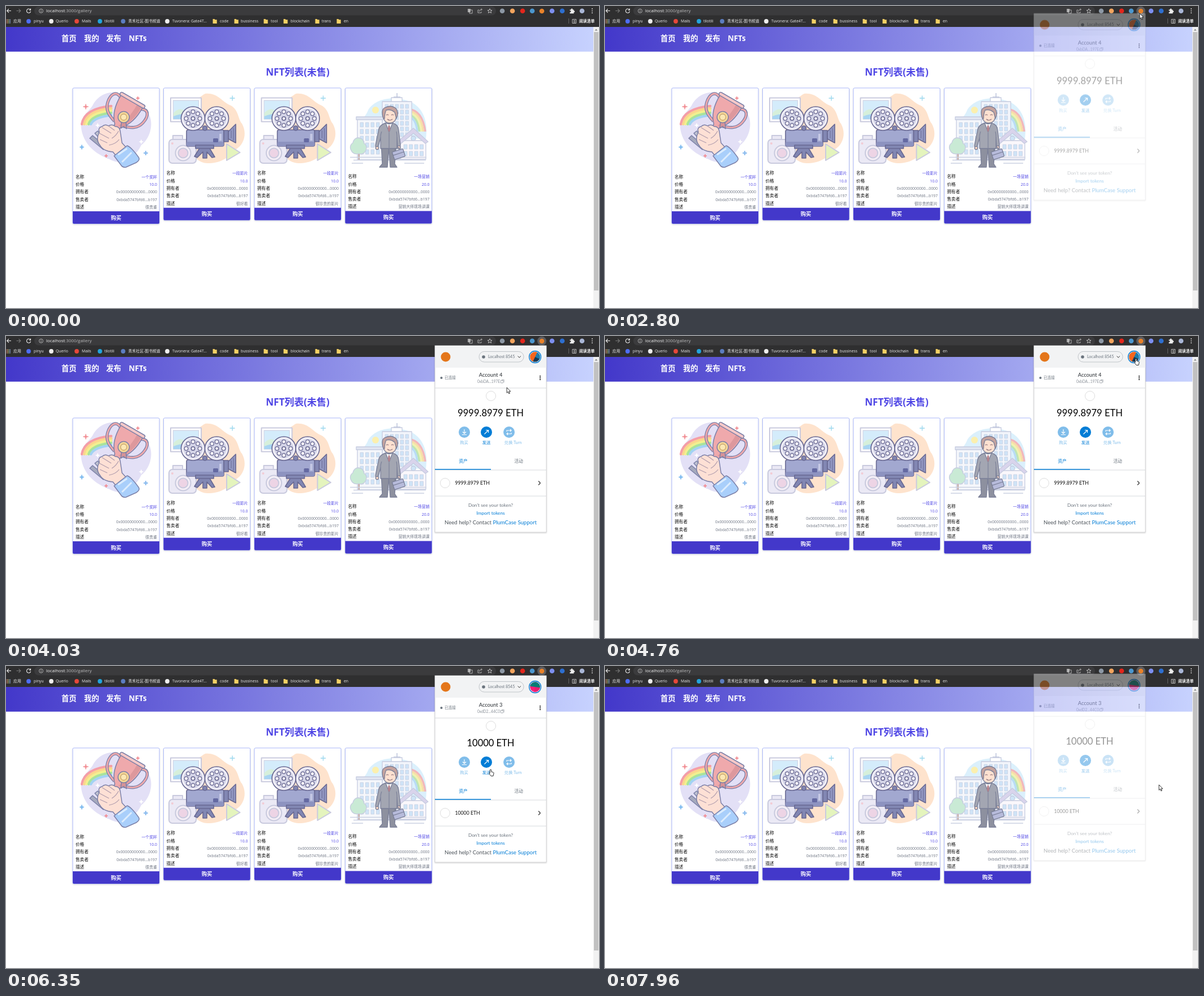
Write an HTML page that moves like this. It is 1048 px wide and 534 px high and loops after 8000 ms.

```html
<!DOCTYPE html>
<html lang="zh">
<head>
<meta charset="utf-8">
<title>NFT gallery</title>
<style>
html, body { margin: 0; width: 100%; height: 100%; overflow: hidden; background: #fff; }
svg { display: block; width: 1048px; height: 534px; font-family: "Open Sans", "Noto Sans CJK SC", "Noto Sans CJK", sans-serif; }
#popup { font-family: Lato, "Noto Sans CJK SC", "Noto Sans CJK", sans-serif; }
#cursor, #popup { animation: 8s linear infinite; }
#hover, #menu, #hand, #arrow, .before, .after { animation: 8s step-end infinite; }
#cursor { animation-name: travel; }
#popup { animation-name: popup; }
#hover { animation-name: hover; }
#menu { animation-name: menu; }
#hand { animation-name: hand; }
#arrow { animation-name: arrow; }
.before { animation-name: before; }
.after { animation-name: after; }
@keyframes travel {
  0%, 4.6% { transform: translate(1060px, 320px); }
  4.63% { transform: translate(1041px, 300px); }
  9.4% { transform: translate(956px, 24px); }
  14.1%, 15% { transform: translate(966px, 32px); }
  18% { transform: translate(884px, 10px); }
  21%, 21.6% { transform: translate(944px, 28px); }
  25%, 27.6% { transform: translate(947px, 12px); }
  28.5%, 41.7% { transform: translate(945px, 13px); }
  48.6%, 49.5% { transform: translate(880px, 96px); }
  59.5%, 61.5% { transform: translate(937px, 40px); }
  70.1%, 76.7% { transform: translate(853px, 183px); }
  76.8%, 90.4% { transform: translate(855px, 183px); }
  94.6%, 100% { transform: translate(979px, 210px); }
}
@keyframes popup {
  0%, 34% { opacity: 0; transform: translateY(-6px); }
  36.75%, 97.5% { opacity: 1; transform: none; }
  99.5%, 100% { opacity: .42; transform: translateY(-3px); }
}
@keyframes hover { 0% { opacity: 0; } 20.5% { opacity: 1; } }
@keyframes menu { 0% { opacity: 0; } 61.25% { opacity: 1; } 78.5%, 100% { opacity: 0; } }
@keyframes hand { 0% { opacity: 0; } 58.8% { opacity: 1; } 91%, 100% { opacity: 0; } }
@keyframes arrow { 0% { opacity: 1; } 58.8% { opacity: 0; } 91%, 100% { opacity: 1; } }
@keyframes before { 0% { opacity: 1; } 78.5%, 100% { opacity: 0; } }
@keyframes after { 0% { opacity: 0; } 78.5%, 100% { opacity: 1; } }
</style>
</head>
<body>
<svg id="stage" viewBox="0 0 1048 534"></svg>
<script>
const text = (x, y, size, str, fill = '#000', extra = '') =>
  `<text x="${x}" y="${y}" font-size="${size}" fill="${fill}" ${extra}>${str}</text>`;
const mid = 'text-anchor="middle"', end = 'text-anchor="end"', bold = 'font-weight="700"';
const rect = (x, y, w, h, fill, extra = '') =>
  `<rect x="${x}" y="${y}" width="${w}" height="${h}" fill="${fill}" ${extra}/>`;
const disc = (x, y, r, fill, extra = '') => `<circle cx="${x}" cy="${y}" r="${r}" fill="${fill}" ${extra}/>`;
const line = (d, stroke, w = 1, extra = '') =>
  `<path d="${d}" fill="none" stroke="${stroke}" stroke-width="${w}" ${extra}/>`;
const shape = (d, fill, extra = '') => `<path d="${d}" fill="${fill}" ${extra}/>`;
const group = (body, attrs) => `<g ${attrs}>${body}</g>`;
const edge = (color, w = 1.5) => `stroke="${color}" stroke-width="${w}" stroke-linejoin="round"`;
const each = (list, fn) => list.map(fn).join('');
const range = n => [...Array(n).keys()];

function browser() {
  const marks = [[49, 'pinyu'], [88, 'Querlo'], [134, 'Mails'], [174, 'tilotili'], [216, '青禾社区-图书频道'],
    [294, 'Tuvonera: Gate4T...'], [378, 'code'], [415, 'bussiness'], [468, 'tool'], [503, 'blockchain'],
    [558, 'trans'], [597, 'en']];
  const icons = [[40, '#4e6ef2'], [80, '#eee'], [125, '#e5483b'], [166, '#23a4dc'], [207, '#5c7dc0'], [285, '#eee']];
  const tools = [[877, '#8d98a5'], [895, '#f3a45e'], [913, '#e3261c'], [930, '#4c97cf'],
    [965, '#7d8ff0'], [983, '#2e6fd0'], [1018, '#a9b6d6']];
  return rect(0, 0, 1048, 37, '#2f2f30') + rect(50, 1, 816, 15.5, '#3b3b3d', 'rx="7.7"') +
    line('M9 8.5H2M5 5.2L1.7 8.5L5 11.8', '#eee', 1.1) +
    line('M18.5 8.5h7M22.5 5.2l3.3 3.3l-3.3 3.3', '#777', 1.1) +
    line('M43 6.5A3.6 3.6 0 1 0 43.6 9.5M43.5 4.5v2.7h-2.7', '#eee', 1.1) +
    disc(62, 8.7, 3.5, 'none', edge('#ccc', .8)) + line('M62 8v2.5M62 6.6v.8', '#ccc', .9) +
    text(71, 11.4, 7.9, 'localhost<tspan fill="#bbb">:3000/gallery</tspan>', '#f4f4f4') +
    rect(816, 5, 5, 6, '#aaa') + rect(819, 7, 5, 6, 'none', edge('#ccc', .8)) +
    line('M836 7h-2v5h6v-2M836 10q1-4 5-4M839.5 4.5l2 1.6l-2 1.8', '#ccc', .8) +
    shape('M855 4.8l1.1 2.6 2.8.2-2.1 1.9.7 2.8-2.5-1.5-2.5 1.5.7-2.8-2.1-1.9 2.8-.2z', 'none', edge('#ddd', .8)) +
    disc(947, 8.8, 8, '#5d5d60', 'id="hover"') + disc(947, 9, 4.3, '#e8822a') +
    each(tools, ([x, c]) => disc(x, 8.8, 4.3, c)) +
    shape('M996.5 6.5h2.2a1.4 1.4 0 1 1 2.6 0h2.2v2a1.3 1.3 0 1 1 0 2.5v2.2h-7v-2.4a1.3 1.3 0 1 0 0-2.4z', '#eee') +
    each([5, 8.6, 12.2], y => disc(1036, y, .9, '#eee')) +
    each(range(9), i => rect(1 + i % 3 * 2.6, 23.6 + (i / 3 | 0) * 2.6, 1.7, 1.7, ['#d98b6b', '#a9bf79', '#8aa6d1'][i % 3])) +
    text(13, 29.4, 6.9, '应用', '#eee') +
    each(icons, ([x, c]) => disc(x, 27, 3.9, c)) +
    each([369, 407, 459, 494, 550, 588], x => shape(`M${x - 3.5} 23h3l1 1.2h3.2v6.8h-7.2z`, '#f3d065')) +
    each(marks, ([x, s]) => text(x, 29.4, 6.8, s, '#eee')) +
    line('M994.5 22v9', '#666') + rect(1001, 23.5, 6.5, 7, 'none', edge('#ddd', .8)) +
    line('M1003 25.5h3M1003 27.2h3M1003 29h3', '#ddd', .8) + text(1013, 29.4, 6.8, '阅读清单', '#fff', bold);
}

const spark = (x, y, r, c) =>
  shape(`M${x} ${y - r}Q${x} ${y} ${x + r} ${y}Q${x} ${y} ${x} ${y + r}Q${x} ${y} ${x - r} ${y}Q${x} ${y} ${x} ${y - r}`, c, edge(c, 1));

function trophy() {
  const dark = '#7c80a8', ink = edge(dark, 1.5), red = '#efa9ac';
  const handle = s => `M${s * 21} -21C${s * 34} -28 ${s * 39} -16 ${s * 36} -2C${s * 33} 12 ${s * 22} 17 ${s * 9} 21`;
  const cup = each([1, -1], s => line(handle(s), dark, 5.4) + line(handle(s), red, 2.8)) +
    shape('M-22 -25Q-23 8 -6 25L-4 42H4L6 25Q23 8 22 -25Z', red, ink) +
    shape('M11 -24Q11 6 1 24H5Q20 8 20 -24Z', '#dd989d') + rect(-25, -30, 50, 6, '#f6c9c8', 'rx="3" ' + ink);
  return shape('M133 217C130 195 144 190 153 176C162 158 183 147 204 156C224 158 233 171 248 184C263 202 257 232 239 246C229 268 205 284 183 271C164 264 138 249 133 217Z', '#e3e0f6') +
    each(['#f59ea6', '#fbd58d', '#f2f08f', '#a9e39b', '#a3d3f3'], (c, i) =>
      line(`M${134 + i * 4} 209Q${139 + i * 4} ${181 + i * 4} 186 ${177 + i * 4}`, c, 4.3, 'stroke-linecap="round"')) +
    group(cup, 'transform="translate(210 190) rotate(30)"') +
    shape('M204 205l-1 11 5-3 5 4-1-12z', '#d79397', ink) + disc(208, 196.5, 10, '#f6d797', ink) +
    disc(208, 196.5, 5.5, '#fbe7b4', edge('#c9a56e', 1.3)) +
    shape('M148 234l5-5 24 20-5 5z', '#a5a9bd', ink) +
    shape('M157 225l5-4 16 18-4 5z', '#bfc2d2', ink) +
    shape('M165 223Q162 215 170 213Q175 208 181 212Q188 208 193 213Q201 213 202 222L205 242L216 254L200 272L189 258Q172 257 166 246Q158 236 165 223Z', '#fde0d5', ink) +
    line('M170 215l16 10M165 225l17 9M166 236l13 6M181 212l11 8M187 234q8-5 12-13M182 246q12-2 18-10', '#b09cad', 1.2) +
    shape('M191 265L214 247Q221 249 234 267Q238 272 230 277L212 285Q206 286 203 281Z', '#a9cffb', ink) +
    line('M198 263l16-11M205 276l17-17', '#dcecfe', 3) +
    spark(141, 178, 4.5, '#f28f95') + spark(233, 163, 3, '#f28f95') + spark(177, 265, 3, '#f28f95') +
    spark(247, 260, 4, '#8abbee') + spark(134, 249.5, 4, '#7dbaf0') + spark(239, 240, 3.5, '#fff') + spark(162, 211, 3.5, '#fff');
}

function film() {
  const dark = '#686892', ink = edge(dark, 1.6), pale = edge('#c9cade', 2);
  const reel = x => disc(x, 199, 21, '#f0eef6', ink) + disc(x, 199, 17, '#d5d5e8') +
    each(range(8), i => disc(x + 12 * Math.cos(i * Math.PI / 4), 199 + 12 * Math.sin(i * Math.PI / 4), 3.3, '#f4f1f7', edge(dark, 1.3))) +
    disc(x, 199, 3.2, '#f4f1f7', edge(dark, 1.6));
  return shape('M319 216C315 188 334 165 352 155C372 153 379 166 393 174C412 181 409 199 417 208C427 226 420 245 407 253C391 270 379 278 356 278C330 277 319 248 319 216Z', '#fee3cd') +
    rect(291, 162.5, 54, 42, '#fff', pale) + rect(295.5, 167, 45, 33, '#d4ecfb', edge('#d3d7e8', 1.3)) +
    shape('M296 189Q307 177 317 187Q328 178 340 190V199.5H296Z', '#d6efdb') + shape('M296 195q22-9 44 0v5h-44z', '#a9d5f2') +
    rect(288, 236, 48, 42, '#ebe9f5', 'rx="6" ' + pale) + rect(295, 229, 17, 7, '#ebe9f5', pale) +
    disc(313, 260, 13.5, '#f5eff7', pale) + disc(313, 260, 8.5, '#edd4e5', pale) + disc(294, 243, 2, '#f3cbd4') +
    shape('M390 244L413.5 259L390 273Z', '#e4f4bd', pale) +
    line('M400 158.5v9M395.5 163h9', '#9bd8ee', 1.4) +
    shape('M343 250h16l10 17-5 1-9-10v11h-7v-11l-10 10-5-2z', '#8287b3', ink) +
    rect(319, 219, 66, 29, '#a2a8d0', 'rx="3" ' + ink) + rect(319, 240, 66, 8, '#8d93c0', 'rx="3"') +
    rect(335, 246, 32, 6, '#8287b3', ink) + rect(385, 220, 8, 20, '#8287b3', ink) +
    shape('M393 222L406 209V242L393 235Z', '#9399c4', ink) + line('M398 220v14M402 216v22', dark) +
    rect(366, 234, 9, 7, '#6469a2', 'rx="1.5"') + rect(377, 226, 4, 12, '#c5c8e4') +
    reel(330.5) + reel(372.5) + disc(351.5, 216, 4, '#8287b3', ink);
}

function speaker() {
  const pale = edge('#c6cce0', 1.3), ink = edge('#7a7f98', 1.3), cloth = '#a3a6b2';
  const windows = (x, y, cols, rows, dx, dy, w, h) => each(range(cols * rows), i =>
    rect(x + i % cols * dx, y + (i / cols | 0) * dy, w, h, '#cfe4f7', edge('#c6cce0', .7)));
  return shape('M625 231C616 207 636 198 640 184C653 163 684 160 704 166C730 171 748 195 742 235Z', '#dbf0fc') +
    each(['#f2b7bc', '#f8dda8', '#f1f2b0', '#bfe5b4', '#b9dcf5'], (c, i) =>
      line(`M710 ${182 + i * 3.5}Q${736 - i * 3} ${184 + i * 3} ${741 - i * 3.5} 222`, c, 3.6)) +
    disc(653, 184, 6, '#fbefae') +
    line('M691 154v15M685 161h12', '#bcc3db', 1.5) + rect(681, 162, 19, 8, '#fff', pale) +
    rect(665, 169, 52, 102, '#f2f5fb', pale) + windows(670, 174, 5, 6, 9, 10, 5.5, 7) +
    rect(621, 198, 44, 74, '#f5f7fb', pale) + rect(619, 196, 48, 5, '#e1e6f2', pale) + windows(626, 206, 4, 5, 9.5, 12, 5.5, 8) +
    rect(697, 238, 45, 33, '#faf7fb', pale) + shape('M692 240L720 216L746 240L741 243L720 225L697 244Z', '#d9d4ec', pale) +
    windows(703, 245, 4, 2, 9.5, 12, 6, 8) + disc(720, 234, 4, '#cfe4f7', pale) +
    rect(622.5, 255, 2.5, 17, '#c3a9a5') +
    shape('M609 253Q607 246 613 242Q615 233 623 233Q632 234 633 243Q639 247 636 255Q632 264 623 261Q613 264 609 253Z', '#c9ead5', pale) +
    line('M608 267.5h135M614 272.5h128M611 278h20M704 278h35', '#ccd1e2', 1.3) +
    shape('M663 242L665 279L660 285H674L676.5 252L679 285H691L687 279L690 242Z', '#8d909f', ink) +
    shape('M671 207Q659 210 658 222L653 246Q652 251 657 251L662 233V252H691V233L692 249Q697 251 697 245L694 220Q693 209 683 207Z', cloth, ink) +
    shape('M671 207l6 16 6-16-6 2z', '#fff', ink) + shape('M675.7 211h2.6l1 7-2.3 5-2.3-5z', '#b5838c') +
    line('M677 224v27M662 233q0-7 2-11M691 233q0-7-1-11', '#7a7f98', 1.1) +
    shape('M666 192Q665 180 677 179Q690 180 690 192Q690 207 677.5 207Q667 206 666 192Z', '#fde0d0', ink) +
    shape('M667 199Q662 184 669 180Q680 174 689 181Q695 188 690 199L687 188Q680 182 672 184Q669 190 669 199Z', '#c5a39f', ink) +
    line('M672 193q2-2 4 0M681 193q2-2 4 0M674 200q4 4 9 0', '#8b717b', 1.1) +
    disc(656, 251, 2.7, '#fbd8c5', ink) + disc(694.5, 250, 2.7, '#fbd8c5', ink) +
    group(rect(684, 255, 20, 14, '#b7bbdb', 'rx="1.5" ' + ink) + line('M690 255v-4h8v4M684 261h20', '#7a7f98', 1.2), 'transform="rotate(-18 694 262)"');
}

function card(x, dy, art, name, price, note) {
  const rows = [['名称', name], ['价格', price], ['拥有者', '0x00000000000...0000'], ['售卖者', '0xbda5747bfd6...b197'], ['描述', note]];
  return rect(x, 145, 153, 240 + dy, '#fff', 'rx="2" stroke="#a5b4fc" stroke-width=".9" filter="url(#soft)"') + art +
    each(rows, ([label, value], i) => {
      const y = 304.7 + dy + i * 13.3;
      return text(x + 5, y, 7.6, label, '#111') +
        text(x + 149, y, 6.9, value, i < 2 ? '#4f46e5' : '#6b7280', end);
    }) +
    shape(`M${x} ${363 + dy}h153v20q0 2-2 2h-149q-2 0-2-2z`, '#4338ca') +
    text(x + 76.5, 377.5 + dy, 9.3, '购买', '#fff', `${mid} ${bold}`);
}

function page() {
  return rect(0, 37, 1038, 43.7, 'url(#nav)') +
    each([[98, '首页'], [138, '我的'], [177, '发布'], [217, 'NFTs']], ([x, s]) => text(x, 62, 13.3, s, '#fff', bold)) +
    text(515.5, 123.3, 17, 'NFT列表(未售)', '#4f46e5', `${mid} ${bold}`) +
    card(118, 0, trophy(), '一个奖杯', '10.0', '很贵重') +
    card(278.5, -6.3, film(), '一段影片', '10.0', '很好看') +
    card(439, -6.3, group(film(), 'transform="translate(160.5)"'), '一段影片', '10.0', '很珍贵的影片') +
    card(599.5, -.5, speaker(), '一场营销', '20.0', '营销大师现场讲课') +
    rect(1038, 37, 10, 497, '#f1f1f1') + rect(1039, 46, 8, 457, '#c1c1c1') +
    shape('M1040.5 43.5l2.5-3 2.5 3z', '#8a8a8a');
}

const blob = (x, y, r, base, half, angle, wedge) => group(
  disc(0, 0, r, base) + shape(`M${-r} 0A${r} ${r} 0 0 1 ${r} 0Z`, half) +
  shape(`M0 0L${r} 0A${r} ${r} 0 0 1 0 ${r}Z`, wedge), `transform="translate(${x} ${y}) rotate(${angle})"`);
const face = {
  1: (x, y, r) => blob(x, y, r, '#f5961d', '#2385c4', -135, '#168c83'),
  2: (x, y, r) => blob(x, y, r, '#f5861d', '#086b78', 25, '#184f6e'),
  3: (x, y, r) => blob(x, y, r, '#f81d78', '#087d75', 8, '#ea1d70'),
  4: (x, y, r) => blob(x, y, r, '#173956', '#f5651c', -65, '#1b7dac')
};

function account(n, address, balance) {
  return face[n](935, 37, 9) + text(856.5, 72.2, 9.3, 'Account ' + n, '#24292e', mid) +
    text(853, 83.4, 6.6, address, '#8a9099', mid) +
    text(856.5, 141.5, 16.5, balance, '#000', mid) + text(793.5, 263, 8.7, balance, '#111');
}

function popup() {
  const blue = '#037dd6', gray = '#6a737d', ring = edge('#ddd', 1);
  const actions = [[810, 809.5, '购买', 'M810 165v7M807 169.5l3 3 3-3M806 174.5h8'],
    [849, 849, '发送', 'M845.5 173.5l7-7M848 166.5h4.5v4.5'],
    [889, 896, '兑换 Turn', 'M885 169v-2h8M891 165l2 2-2 2M893 171v2h-8M887 171l-2 2 2 2']];
  return rect(758, 17, 197, 330, '#fff', 'stroke="#c4c4c6" stroke-width=".8" filter="url(#soft)"') +
    rect(758.5, 17, 196, 39, '#f2f3f4') + disc(777, 37, 8.5, '#e4761b') +
    rect(836, 27.5, 79, 18.5, 'none', 'rx="9.2" ' + edge('#bbc0c5', .9)) + disc(844, 37, 2.8, gray) +
    text(852, 39.3, 7, 'Localhost 8545', gray) + line('M904.5 35.5l2.7 2.7l2.7-2.7', '#333') +
    disc(935, 37, 10.5, '#fff', edge(blue, 1.3)) +
    disc(769.5, 74, 2.1, gray) + text(775, 76.4, 6.7, '已连接', gray) +
    rect(874.5, 78.5, 4, 4.5, 'none', edge('#8a9099', .7)) + line('M876 77.5h4.2v4.5', '#8a9099', .7) +
    each([71, 74, 77], y => disc(944, y, 1.1, '#111')) +
    line('M758 92h197', '#d6d9dc') + disc(857, 106, 8.5, '#fff', ring) +
    group(account(4, '0xbDA...197E', '9999.8979 ETH'), 'class="before"') +
    group(account(3, '0xdD2...44C0', '10000 ETH'), 'class="after"') +
    each(actions, ([x, tx, s, d]) => group(disc(x, 170, 10, blue) + line(d, '#fff', 1.2) +
      text(tx, 190.6, 7.3, s, blue, mid), x === 849 ? '' : 'opacity=".5"')) +
    text(808, 224, 7.8, '资产', blue, mid) + text(906, 224, 7.8, '活动', gray, mid) +
    line('M758 237h197M758 283h197', '#d6d9dc') + line('M758 235.7h99', blue, 1.4) +
    disc(776, 260, 8.5, '#fff', ring) + line('M941 256.5l3.3 3.5l-3.3 3.5', '#333', 1.2) +
    text(856.5, 302.2, 8.3, "Don't see your token?", gray, mid) + text(856.5, 316, 8.2, 'Import tokens', blue, mid) +
    text(856.5, 333.3, 9.6, `Need help? Contact <tspan fill="${blue}">PlumCase Support</tspan>`, '#4b5259', mid) + menu();
}

function menu() {
  const row = n => {
    const y = 101 + (n - 1) * 37.4;
    return (n === 3 ? rect(774.5, y - 13, 167, 37, '#fff', 'opacity=".06"') : '') + face[n](803, y, 7) +
      text(816, y + 3.3, 9.9, 'Account ' + n, '#fff') + text(816, y + 14.3, 7.8, n === 1 ? '0 ETH' : '10000 ETH', '#9b9b9b') +
      (n > 1 ? rect(885, y - 4.5, 25.5, 9, '#9b9b9b', 'rx="4.5"') + text(897.7, y + 2.5, 6.8, '已导入', '#222', mid) : '') +
      disc(924.5, y + 1.5, 9, '#fff') + disc(924.5, y + 1.5, 5.4, '#41b883');
  };
  const items = [[227, '创建账户', 'M782.5 227h8.5M786.7 222.7v8.5'],
    [254.5, '导入账户', 'M786.5 250v6M784 253.5l2.5 2.7l2.5-2.7M782.5 258.5h8'],
    [282, '连接硬件钱包', 'M786.5 277.5v9M784 280v2.5l2.5 1.5M789 279.5v2l-2.5 1.5']];
  return group(rect(774.5, 49, 175.5, 298, '#000', 'opacity=".8" rx="2"') +
    text(782, 71.4, 8.8, '我的账户', '#fff') + rect(910.5, 57, 32, 22, 'none', 'rx="11" ' + edge('#888', .8)) +
    text(926.5, 66.2, 7, '锁', '#fff', mid) + text(926.5, 75, 7, '定', '#fff', mid) +
    group(each([1, 2, 3, 4], row), 'clip-path="url(#list)"') + line('M787 212l2 1.5l3-4', '#fff', 1.2) +
    rect(941.5, 87.5, 8, 125, '#f1f1f1') + rect(942.3, 97, 6.5, 90, '#c1c1c1') +
    shape('M943.5 93.5l2-2.5 2 2.5z', '#888') + shape('M943.5 207l2 2.5 2-2.5z', '#444') +
    disc(935.5, 198, 7.5, '#777', edge('#aaa', .8)) + line('M935.5 194.5v6M933 198.5l2.5 2.5l2.5-2.5', '#ccc', .9) +
    line('M774.5 87.5h167M774.5 213h175.5M774.5 296h175.5', '#777', .8) +
    each(items, ([y, s, d]) => line(d, '#ddd') + text(798, y + 3.2, 8.8, s, '#fff')) +
    disc(786, 309, 3.4, '#fff') + disc(790, 311.5, 2.8, '#fff') + text(798, 313.3, 9.3, 'Support', '#fff') +
    disc(786.5, 337.5, 2.5, 'none', edge('#ddd', 1.2)) +
    disc(786.5, 337.5, 3.9, 'none', 'stroke="#ddd" stroke-width="1.5" stroke-dasharray="1.5 1.56"') +
    text(798, 341.2, 8.8, '设置', '#fff'), 'id="menu"');
}

const cursor = () => group(
  shape('M0 0V9.5L2.2 7.5L3.7 11L5.3 10.3L3.8 7H6.7Z', '#fff', 'id="arrow" ' + edge('#000', .8)) +
  shape('M1.3 0Q2.5-.3 2.6 1V4L6.2 4.9Q7.2 5.3 7 7L6 11.5H2L-1 7.5Q-1.5 6 .2 6.5V1Q.2 .2 1.3 0Z', '#fff', 'id="hand" ' + edge('#000', .8)), 'id="cursor"');

document.getElementById('stage').innerHTML = `<defs>
  <linearGradient id="nav"><stop stop-color="#4338ca"/><stop offset="1" stop-color="#c7d2fe"/></linearGradient>
  <clipPath id="list"><path d="M774 87h176v126h-176z"/></clipPath>
  <filter id="soft" x="-5%" y="-5%" width="110%" height="110%"><feDropShadow dx="0" dy="1" stdDeviation="1" flood-opacity=".2"/></filter>
</defs>` + rect(0, 0, 1048, 534, '#fff') + page() + browser() + group(popup(), 'id="popup"') + cursor();
</script>
</body>
</html>
```
